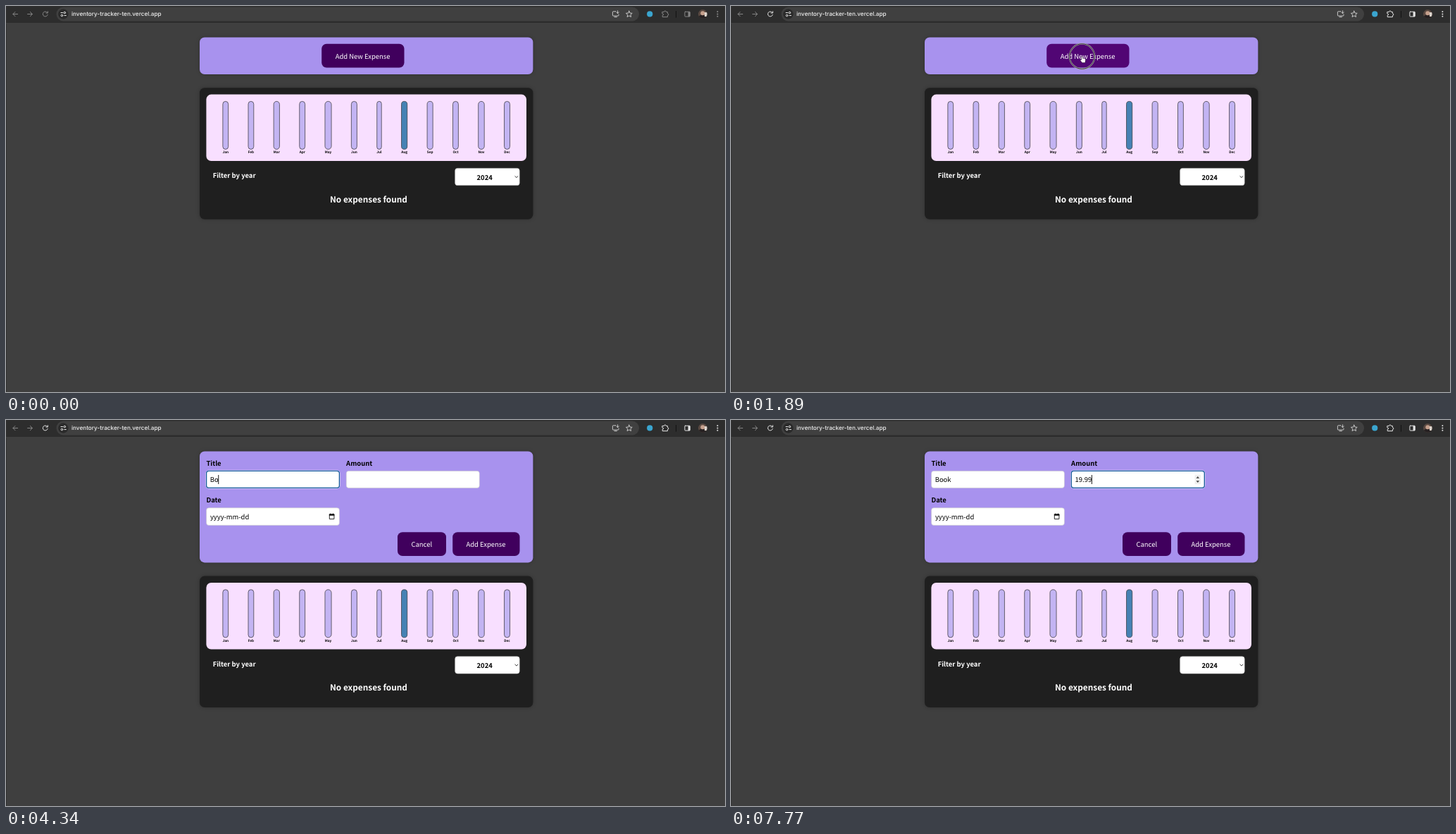
Animation, 1021 px wide and 548 px high, one loop 8000 ms. Source, as an HTML page:

```html
<!DOCTYPE html>
<html lang="en">
<head>
<meta charset="utf-8">
<title>Expense tracker</title>
<style>
  html, body { margin: 0; width: 100%; height: 100%; overflow: hidden; background: #3f3f3f; }
  svg { display: block; width: 1021px; height: 548px; }
  text { font: 400 9.45px "Noto Sans CJK JP", "Noto Sans CJK SC", "Noto Sans", sans-serif; text-rendering: geometricPrecision; white-space: pre; }
  .b { font-weight: 700; }
  .w { fill: #fff; }
  .h { font-size: 11.82px; }
  .month { font-size: 4.73px; font-weight: 700; text-anchor: middle; }
  .url { font: 500 8.2px Inter, Roboto, sans-serif; fill: #f0f0f0; }
  .card { filter: drop-shadow(0 .6px 2.4px rgba(0, 0, 0, .25)); }
  .btn { fill: #40005d; }
  .btn.hover { fill: #510674; }
  .field { fill: #fff; stroke: #ccc; stroke-width: .6; }
  .line { fill: none; stroke: #c8c8c8; stroke-width: 1; stroke-linecap: round; stroke-linejoin: round; }
  .dim { stroke: #858585; }
  .wake { stroke: #858585; }
  .awake .wake { stroke: #e4e4e4; }
  .dots { fill: #8c8c8c; }
  .awake .dots { fill: #e4e4e4; }
  .focus rect { fill: none; }
  .glyph { fill: #111; stroke: #fff; stroke-width: .7; stroke-linejoin: round; paint-order: stroke; }
</style>
</head>
<body>
<svg id="stage" viewBox="0 0 1021 548">
  <rect width="1021" height="548" fill="#3f3f3f"/>
  <rect width="1" height="548" fill="#303030"/>

  <g id="toolbar">
    <rect width="1021" height="24.6" fill="#2d2d2d"/>
    <rect y="24.4" width="1021" height=".7" fill="#484848"/>
    <rect x="71.5" y="1.6" width="827.5" height="19.8" rx="9.9" fill="#404040"/>
    <circle cx="81.3" cy="11.5" r="7.2" fill="#2a2a2a"/>
    <path class="line dim" d="M16.6 11.5H10M13 8.4L9.9 11.5L13 14.6M30.6 11.5H37.2M34.4 8.4L37.4 11.5L34.4 14.6"/>
    <path class="line wake" d="M58.7 9.4A3.5 3.5 0 1 0 59.2 12.4M59.3 7.7V10H57"/>
    <path class="line" style="stroke:#eee" d="M78 9.5H80.5M83 13.5H85.3"/>
    <circle class="line" style="stroke:#eee" cx="83.3" cy="9.5" r="1.3"/>
    <circle class="line" style="stroke:#eee" cx="79.4" cy="13.5" r="1.3"/>
    <text class="url" x="93" y="14.4">inventory-tracker-ten.vercel.app</text>
    <path class="line" d="M866 7.8H862.2Q861.4 7.8 861.4 8.6V13.2Q861.4 14 862.2 14H869.2Q870 14 870 13.2V12M864 15.6H867.4M868.6 6.8V10.4M866.9 9L868.6 10.6L870.3 9"/>
    <path class="line" d="M884.8 7.1L886.1 10L889.2 10.3L886.9 12.4L887.5 15.5L884.8 13.9L882.1 15.5L882.7 12.4L880.4 10.3L883.5 10Z"/>
    <circle cx="914.2" cy="11.4" r="4.1" fill="#3aa5cf"/>
    <path class="line wake" d="M932.2 8.4H934.5A1.4 1.4 0 0 1 937.3 8.4H939.4V10.7A1.4 1.4 0 0 1 939.4 13.5V15.6H932.2V13.3A1.3 1.3 0 0 0 932.2 10.7Z"/>
    <rect x="951" y="7" width="1" height="9.5" fill="#111"/>
    <rect class="line wake" x="963.9" y="8.2" width="7.4" height="6.8" rx=".7"/>
    <path class="line wake" style="stroke-width:2.4;stroke-linecap:butt" d="M969.8 8.2V15"/>
    <clipPath id="face"><circle cx="989.3" cy="11.4" r="6.3"/></clipPath>
    <g clip-path="url(#face)">
      <rect x="982" y="4" width="15" height="15" fill="#5b4a42"/>
      <ellipse cx="988.6" cy="17.6" rx="5.6" ry="5" fill="#272122"/>
      <circle cx="989.3" cy="10.2" r="3" fill="#c6a18d"/>
      <rect x="992" y="9" width="4" height="6" fill="#ddd4cc"/>
    </g>
    <g class="dots"><circle cx="1010.4" cy="8.1" r="1"/><circle cx="1010.4" cy="11.4" r="1"/><circle cx="1010.4" cy="14.7" r="1"/></g>
  </g>

  <g id="closed">
    <rect class="card" x="275" y="44.4" width="473.4" height="52.6" rx="7" fill="#a892ee"/>
    <rect id="addNew" class="btn" x="448.2" y="53.8" width="117.3" height="33.7" rx="7"/>
    <text class="w" x="467.7" y="75">Add New Expense</text>
  </g>

  <g id="form">
    <rect class="card" x="275" y="44.4" width="473.4" height="158" rx="7" fill="#a892ee"/>
    <text class="b" x="284.4" y="65">Title</text>
    <text class="b" x="483.1" y="65">Amount</text>
    <text class="b" x="284.4" y="117">Date</text>
    <rect class="field" x="284.6" y="72.4" width="188.8" height="24" rx="3.4"/>
    <rect class="field" x="483.3" y="72.4" width="189" height="24" rx="3.4"/>
    <rect class="field" x="284.6" y="124.8" width="188.8" height="24.6" rx="3.4"/>
    <g id="titleRing" class="focus"></g>
    <g id="amountRing" class="focus"></g>
    <text id="title" x="289.7" y="88.4"></text>
    <text id="amount" x="488.6" y="88.4"></text>
    <text x="289.9" y="141.2">yyyy-mm-dd</text>
    <path d="M459.3 134H465.9V140.6H459.3Z" fill="none" stroke="#111" stroke-width=".9"/>
    <path d="M458.9 133.6H466.3V135.8H458.9ZM460.1 132.7H461.2V134H460.1ZM464 132.7H465.1V134H464Z" fill="#111"/>
    <g id="spinner">
      <rect x="658.6" y="77.6" width="8.4" height="13.6" fill="#efefef"/>
      <path d="M660.5 82.7L662.8 80L665.1 82.7ZM660.5 86.3L662.8 89L665.1 86.3Z" fill="#444"/>
    </g>
    <rect id="caret" y="78" width=".9" height="13" fill="#000"/>
    <rect class="btn" x="556" y="159.3" width="69" height="33.7" rx="7"/>
    <text class="w" x="575.5" y="180.4">Cancel</text>
    <rect class="btn" x="634.2" y="159.3" width="95.3" height="33.7" rx="7"/>
    <text class="w" x="653.5" y="180.4">Add Expense</text>
  </g>

  <g id="panel">
    <rect class="card" x="275" y="116.2" width="473.4" height="186.5" rx="7" fill="#1f1f1f"/>
    <rect x="284.4" y="125.6" width="454.6" height="94.5" rx="7" fill="#f8dfff"/>
    <g id="bars"></g>
    <text class="b w" x="293.7" y="244.3">Filter by year</text>
    <rect class="field" x="637.7" y="230.4" width="91.5" height="24.2" rx="3.4"/>
    <g id="yearRing" class="focus"></g>
    <text class="b" x="668.5" y="246.7">2024</text>
    <path d="M722.6 241.4L724.9 243.6L727.2 241.4" fill="none" stroke="#222" stroke-width=".9"/>
    <text class="b w h" x="460" y="279">No expenses found</text>
  </g>

  <g id="pointer">
    <g id="ring" fill="none">
      <circle r="17.8" stroke="#b0b0b0" stroke-opacity=".85" stroke-width="2.2"/>
      <circle r="17.8" stroke="#333" stroke-width=".9"/>
    </g>
    <path id="arrow" class="glyph" d="M0 0V8L1.8 6.4L3 9.1L4.3 8.5L3.1 5.9H5.5Z"/>
    <path id="hand" class="glyph" style="fill:#fff;stroke:#111" d="M-.7 .6Q0 -.4 .8 .6V3L4 3.6Q4.9 3.9 4.8 5L4.2 8.8H.2L-2.4 5.6Q-2.4 4.4 -.7 5.2Z"/>
    <path id="beam" class="glyph" style="fill:none;stroke:#222;stroke-width:.8" d="M-1.7 -5Q0 -5 0 -4V4Q0 5 -1.7 5M1.7 -5Q0 -5 0 -4M0 4Q0 5 1.7 5"/>
  </g>
</svg>
<script>
const LOOP = 8000, STEP = 70, OPEN = 1960;
const NS = "http://www.w3.org/2000/svg";
const $ = id => document.getElementById(id);
const show = (id, on) => $(id).setAttribute("display", on ? "inline" : "none");

function add(parent, tag, attrs, text = "") {
  const el = document.createElementNS(NS, tag);
  for (const k in attrs) el.setAttribute(k, attrs[k]);
  el.textContent = text;
  parent.append(el);
}

// Month bars are as wide as their labels, with equal space around each.
const months = { Jan: 8.4, Feb: 8.4, Mar: 8.9, Apr: 8.5, May: 9.7, Jun: 8.6, Jul: 7.1, Aug: 8.8, Sep: 8.7, Oct: 8.5, Nov: 9.1, Dec: 8.6 };
const gap = (436 - Object.values(months).reduce((a, b) => a + b)) / 12;
let left = 293.7 + gap / 2;
for (const [name, w] of Object.entries(months)) {
  add($("bars"), "rect", { x: left + .3, y: 135.4, width: w - .6, height: 68, rx: (w - .6) / 2,
    fill: name === "Aug" ? "#4682b4" : "#c3b4f3", stroke: "#313131", "stroke-width": .7 });
  add($("bars"), "text", { class: "month", x: left + w / 2, y: 209.4 }, name);
  left += w + gap;
}

function focusRing(id, x, y, w, h) {
  add($(id), "rect", { x: x - .7, y: y - .7, width: w + 1.4, height: h + 1.4, rx: 4, stroke: "#fff", "stroke-width": .8 });
  add($(id), "rect", { x, y, width: w, height: h, rx: 3.4, stroke: "#14599c", "stroke-width": 1.3 });
}
focusRing("titleRing", 284.6, 72.4, 188.8, 24);
focusRing("amountRing", 483.3, 72.4, 189, 24);
focusRing("yearRing", 637.7, 230.4, 91.5, 24.2);

// Pointer moves: start, end, from, bend, to.
const moves = [
  [0, 840, [532, 498], [500, 180], [456, 24]],
  [840, 1120, [456, 24], [472, 38], [483, 64.5]],
  [1330, 1680, [483, 64.5], [489, 71], [498.5, 71.5]],
  [2170, 2800, [498.5, 71.5], [455, 138], [366, 84]]
];
const ease = p => p * p * (3 - 2 * p);
function pointerAt(t) {
  const [from, to, a, b, c] = moves.filter(m => t >= m[0]).pop();
  const p = ease(Math.min(1, (t - from) / (to - from))), q = 1 - p;
  return a.map((v, i) => q * q * v + 2 * q * p * b[i] + p * p * c[i]);
}

const typedTitle = [[3920, "B"], [4340, "Bo"], [4480, "Boo"], [4550, "Book"]];
const typedAmount = [[5180, "1"], [5320, "19"], [7280, "19."], [7630, "19.9"], [7770, "19.99"]];
const latest = (list, t) => list.reduce((s, [at, v]) => t >= at ? v : s, "");
const spans = (list, t) => list.some(([a, b]) => t >= a && t < b);
const inBox = ([x, y], l, top, r, b) => x > l && x < r && y > top && y < b;

function draw(now) {
  const t = Math.floor(now % LOOP / STEP) * STEP;
  const open = t >= OPEN, pos = pointerAt(t);
  const onTitle = t >= 2940 && t < 4620, onAmount = t >= 4620;

  $("toolbar").classList.toggle("awake", t >= 910);
  show("closed", !open);
  show("form", open);
  $("panel").setAttribute("transform", `translate(0 ${open ? 105.4 : 0})`);
  show("yearRing", t >= 910 && t < 1890);
  show("titleRing", onTitle);
  show("amountRing", onAmount);

  $("title").textContent = latest(typedTitle, t);
  $("amount").textContent = latest(typedAmount, t);
  const field = $(onAmount ? "amount" : "title");
  const length = field.textContent ? field.getComputedTextLength() : 0;
  $("caret").setAttribute("x", +field.getAttribute("x") + length - .3);
  show("caret", (onTitle || onAmount) && !spans([[3430, 3920], [5810, 6300], [6860, 7280]], t));

  const overTitle = open && inBox(pos, 284, 72.2, 474, 97);
  const overAmount = open && inBox(pos, 483, 72.2, 673, 97);
  const overButton = !open && t >= 1400;
  const beam = overTitle || overAmount;
  show("spinner", onAmount || overAmount);
  $("addNew").classList.toggle("hover", overButton);
  show("pointer", t >= 70 && t < 3920);
  $("pointer").setAttribute("transform", `translate(${pos})`);
  show("ring", spans([[840, 980], [1890, 1960], [2870, 3010]], t));
  show("hand", overButton);
  show("beam", beam);
  show("arrow", !overButton && !beam);
}

const start = performance.now();
function tick() {
  draw(performance.now() - start);
  requestAnimationFrame(tick);
}
tick();
</script>
</body>
</html>
```
